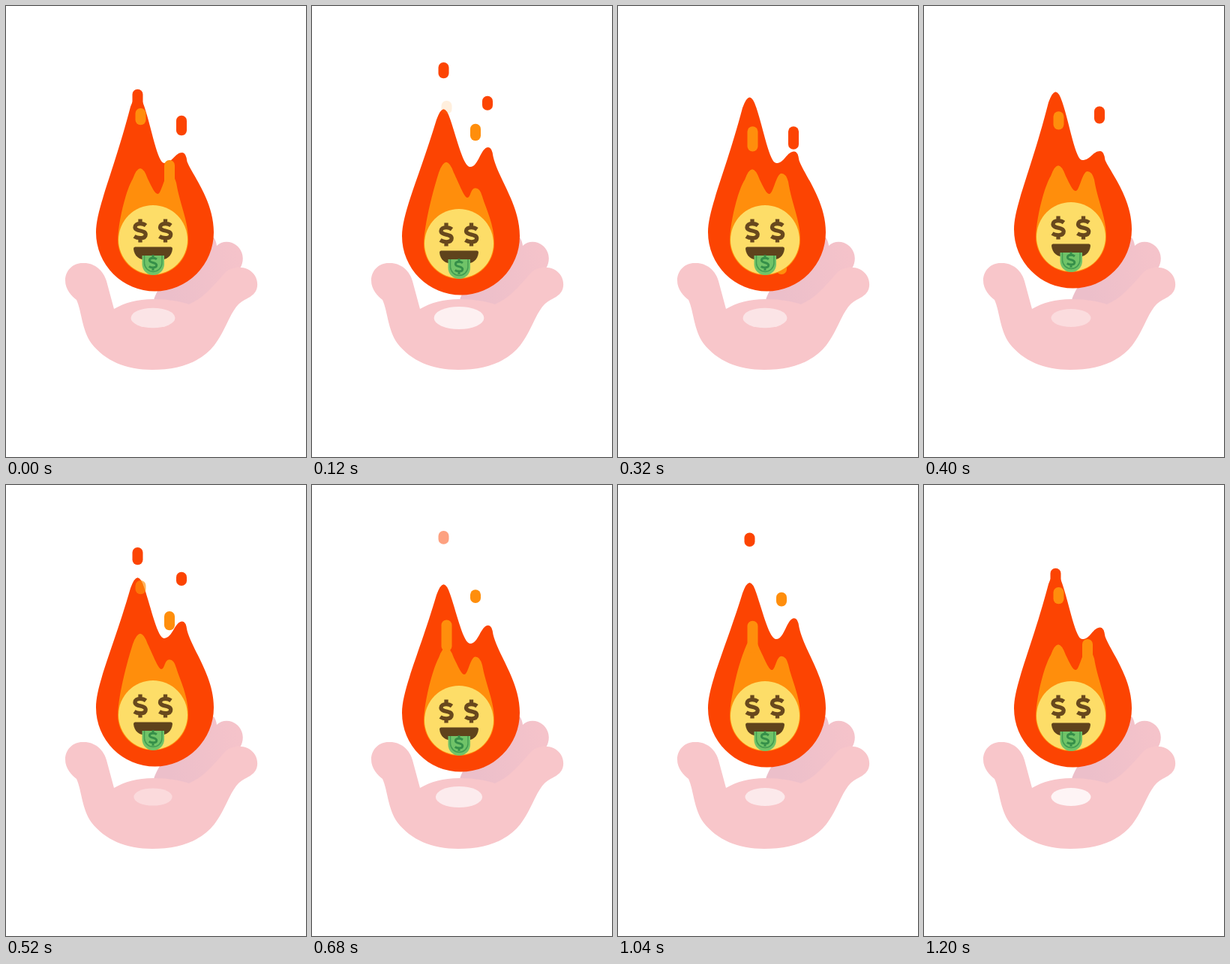
Write an HTML page that moves like this. It is 400x600 px and loops after 1.24 s.

```html
<!DOCTYPE html>
<html lang="en">
<head>
<meta charset="utf-8">
<title>Burning money</title>
<style>
  html, body { margin: 0; height: 100%; overflow: hidden; background: #fff; }
  svg { display: block; width: 100vw; height: 100vh; }
</style>
</head>
<body>
<svg viewBox="0 0 400 600">
  <defs>
    <linearGradient id="shade" gradientUnits="userSpaceOnUse" x1="215" y1="365" x2="312" y2="345">
      <stop offset="0" stop-color="#ecbfca"/>
      <stop offset="1" stop-color="#f5c3ca"/>
    </linearGradient>
    <path id="dollar" fill="none" d="M7.5-7C5-9 2-9.5 0-9.5C-4.5-9.5-7-7.5-7-4.8C-7 1.5 7.2-1.5 7.2 5C7.2 8 4.5 9.7 0 9.7C-3 9.7-6 8.8-8 7.5M0-15.5V-9.5M0 9.5V15.5"/>
  </defs>

  <path fill="url(#shade)" d="M197 391C204 370 225 340 277 308Q280 312 281 319C288 312 300 312 308 319C317 327 318 339 312 349L285 400H200Z"/>
  <path fill="#f8c6ca" d="M79 365C79 352 89 342 102 342C118 341 130 352 134 366L144 403C158 395 175 390 196 390C218 390 232 393 244 397C265 388 280 368 292 355C300 347 313 346 322 350C332 355 336 364 335 373C333 388 318 388 309 398C298 410 293 431 278 451C260 474 230 484 195 484C160 484 132 472 114 449C101 431 101 406 94 391C88 386 79 378 79 365Z"/>
  <ellipse id="glow" cx="196" cy="415" fill="#fff"/>

  <g id="redDrops" fill="#fc4402"></g>
  <g id="fire">
    <path id="outer" fill="#fc4402"/>
    <path id="inner" fill="#ff8e0c"/>
  </g>
  <g id="orangeDrops" fill="#ff8e0c"></g>

  <g id="face">
    <circle cx="196" cy="311" r="46" fill="#fddd68"/>
    <g stroke="#68481d" stroke-width="5.3">
      <use href="#dollar" x="179" y="299"/>
      <use href="#dollar" x="212.5" y="299"/>
    </g>
    <path fill="#5f431c" d="M172 320.5H220Q222 320.5 222 323C221 333 214 338 204 338H188C178 338 171 333 170 323Q170 320.5 172 320.5Z"/>
    <path fill="#70c368" d="M181.5 332H211V343.5A14.75 14.5 0 0 1 181.5 343.5Z"/>
    <path fill="none" stroke="#429d52" stroke-width="1.5" d="M184.5 332V342.5A11.8 12 0 0 0 208 342.5V332"/>
    <use href="#dollar" transform="translate(196 341.5) scale(.66)" stroke="#358f49" stroke-width="4.5"/>
  </g>
</svg>
<script>
const LOOP = 1240, STEP = 40, LIFE = 500;
const $ = id => document.getElementById(id);
const set = (el, attrs) => { for (const key in attrs) el.setAttribute(key, attrs[key]); };
const wave = (t, period, peak) => Math.cos(2 * Math.PI * (t / period - peak));

// Drops rise to `end` with a cubic ease-out, shrinking and then fading.
const drops = [
  { layer: 'redDrops', x: 175.5, end: 59, range: 129, stretch: .25, fade: .2, births: [-131, 305, 704, 1069] },
  { layer: 'redDrops', x: 234, end: 113, range: 166, stretch: .28, fade: .12, births: [-209, 149, 594, 1110] },
  { layer: 'orangeDrops', x: 218, end: 137, range: 190, stretch: .26, fade: .12, births: [-145, 293, 696, 1055] },
  { layer: 'orangeDrops', x: 179.5, end: 125, range: 125, stretch: .45, fade: .19, births: [-278, 148, 559, 922] }
];
for (const drop of drops) {
  drop.pills = drop.births.map(() => {
    const pill = document.createElementNS('http://www.w3.org/2000/svg', 'rect');
    set(pill, { x: drop.x - 7, width: 14, rx: 6.8 });
    return $(drop.layer).appendChild(pill);
  });
}

function drawDrop({ end, range, stretch, fade, births, pills }, t) {
  births.forEach((birth, i) => {
    const age = t - birth;
    const left = age < 0 ? 0 : Math.max(0, 1 - age / LIFE);
    const rest = range * left ** 3;
    set(pills[i], {
      y: end + rest,
      height: 17.3 + stretch * rest,
      opacity: Math.min(1, Math.max(0, (left - fade) / .1))
    });
  });
}

function outerPath(sway) {
  const a = 126 + sway, b = 189 - sway;
  return `M120 301C120 270 143 222 166 ${a + 14}Q171 ${a} 175.5 ${a}Q180 ${a} 184.5 ${a + 14}
    C194 ${a + 42} 202 209 211 209C222 209 225 ${b} 235 ${b}Q240 ${b} 241.5 ${b + 12}
    C248 224 277 259 277 301A78.5 78.5 0 0 1 120 301Z`;
}

function innerPath(sway) {
  const a = 210 + sway, b = 230 - sway, dip = 204.5 - .35 * sway;
  return `M149 311C150 285 160 245 169 ${a + 14}Q174 ${a} 179 ${a}Q184 ${a} 189 ${a + 14}
    C195 ${a + 26} ${dip - 4} 250 ${dip} 250C${dip + 5} 250 211 ${b} 218 ${b}Q224 ${b} 227 ${b + 11}
    C232 265 243 285 243 311A47 47 0 0 1 149 311Z`;
}

function draw(t) {
  const bob = wave(t, 640, .25);
  const shift = `translate(0 ${5.5 * bob})`;
  set($('fire'), { transform: shift });
  set($('face'), { transform: shift });
  set($('outer'), { d: outerPath(8 * wave(t, 440, .385)) });
  set($('inner'), { d: innerPath(8.3 * wave(t, 400, .88)) });
  set($('glow'), {
    rx: 29.5 + 4.2 * bob,
    ry: 13.3 + 1.9 * bob,
    opacity: Math.min(1, .53 + .22 * bob + .5 * (t / LOOP) ** 4)
  });
  drops.forEach(drop => drawDrop(drop, t));
}

const start = performance.now();
function frame() {
  const t = (performance.now() - start) % LOOP;
  draw(Math.floor(t / STEP) * STEP);
  requestAnimationFrame(frame);
}
frame();
</script>
</body>
</html>
```
